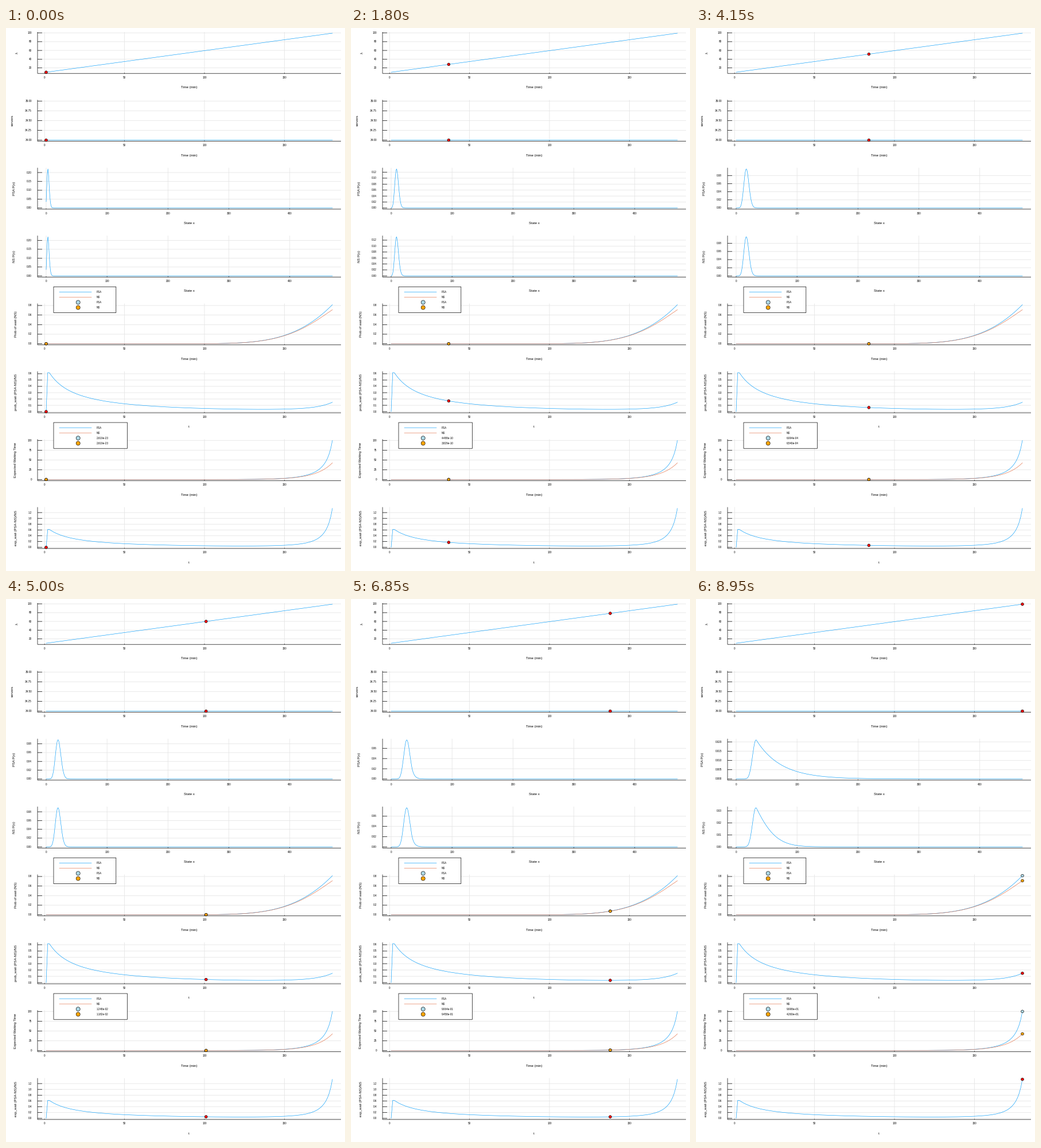
A matplotlib script that plays this animation: 591x947 px, repeating every 9000 ms.

```python
import math

import matplotlib
import matplotlib.pyplot as plt
import numpy as np
from matplotlib.animation import FuncAnimation
from matplotlib.collections import LineCollection
from matplotlib.patches import Circle, Rectangle

W, H, DPI = 591, 947, 100
PX = 72 / DPI
LEFT, RIGHT = 55, 584
ROW = H / 8
BLUE, ORANGE = "#009af9", "#e26f46"
PALE, AMBER, RED = "lightblue", "orange", "red"
THIN = 0.62

SERVERS, MU, N_MAX, STEPS = 34, 3.0, 470, 180
states = np.arange(N_MAX + 1)
times = np.arange(1, STEPS + 1)
service = MU * np.minimum(states, SERVERS)


# Queue model: stationary approximation and the time-dependent solution

def arrival(t):
    return 10 + 0.5 * (t - 1)


def stationary(rate):
    logs = np.concatenate([[0], np.cumsum(np.log(rate / service[1:]))])
    p = np.exp(logs - logs.max())
    return p / p.sum()


def flow(p, rate):
    net = rate * p[:-1] - service[1:] * p[1:]
    d = np.zeros_like(p)
    d[:-1] -= net
    d[1:] += net
    return d


def advance(p, t, n=200):
    h = 1 / n
    for i in range(n):
        s = t + i * h
        mid = arrival(s + h / 2)
        k1 = flow(p, arrival(s))
        k2 = flow(p + h / 2 * k1, mid)
        k3 = flow(p + h / 2 * k2, mid)
        k4 = flow(p + h * k3, arrival(s + h))
        p = p + h / 6 * (k1 + 2 * k2 + 2 * k3 + k4)
    return p


psa = np.array([stationary(arrival(t)) for t in times])
ns = [psa[0]]
for t in times[:-1]:
    ns.append(advance(ns[-1], t))
ns = np.array(ns)

over = np.maximum(states - SERVERS, 0)
prob_psa, prob_ns = (p[:, SERVERS + 1:].sum(axis=1) for p in (psa, ns))
wait_psa, wait_ns = (MU * p @ over for p in (psa, ns))


# Drawing helpers, all in pixels from the top left corner

matplotlib.rcParams["font.family"] = "Liberation Sans"
matplotlib.rcParams["path.snap"] = False
fig = plt.figure(figsize=(W / DPI, H / DPI), dpi=DPI, facecolor="white")
ax = fig.add_axes([0, 0, 1, 1])
ax.set_xlim(0, W)
ax.set_ylim(H, 0)
ax.axis("off")


def text(x, y, s, size=4.6, ha="center", **kw):
    return ax.text(x, y, s, fontsize=size * PX, ha=ha, va="center",
                   color="black", **kw)


def segments(color, width, z):
    lines = LineCollection([], colors=color, linewidths=width * PX, zorder=z)
    ax.add_collection(lines, autolim=False)
    return lines


def stroke(x, y, color, z=3):
    return ax.plot(x, y, color=color, lw=THIN * PX, zorder=z)[0]


def dot(x, y, color, size=4.7, z=4):
    return ax.add_patch(Circle((x, y), size / 2, fc=color, ec="black",
                               lw=THIN * PX, zorder=z))


def widen(lo, hi):
    pad = 0.03 * (hi - lo)
    return lo - pad, hi + pad


def nice_ticks(lo, hi):
    """Pick 4 to 8 ticks, weighing count, roundness and coverage."""
    span = hi - lo
    z = math.floor(math.log10(span))
    best = None
    for e in (z - 1, z):
        for q, nice in ((1, 1), (5, 0.9), (2, 0.7), (2.5, 0.5), (3, 0.2)):
            step = q * 10.0 ** e
            a = math.ceil(lo / step - 1e-9)
            b = math.floor(hi / step + 1e-9)
            n = b - a + 1
            if not 4 <= n <= 8:
                continue
            score = (0.25 * (1 - abs(n - 5) / 5) + 0.25 * nice
                     + 0.5 * span / ((n - 1) * step))
            key = (round(score, 9), -n)
            if best is None or key > best[0]:
                best = key, step, a, b
    _, step, a, b = best
    digits = len(f"{step:.8g}".partition(".")[2])
    return [(k * step, f"{k * step:.{digits}f}") for k in range(a, b + 1)]


class Panel:
    def __init__(self, row, xs, xlabel, ylabel, shift=0):
        self.top = 7 + ROW * row
        self.base = self.top + 72.2
        self.xs, self.shift = xs, shift
        self.xlim = widen(xs[0], xs[-1])
        self.grid = segments("#e4e4e4", 0.8, 1)
        self.marks = segments("black", 0.7, 2)
        self.labels = [text(45, 0, "", ha="right") for _ in range(8)]
        middle = (self.top + self.base) / 2
        self.name = text(18, middle, ylabel, 6, rotation=90)
        text((LEFT + RIGHT) / 2 - 0.5, self.base + 24.6, xlabel, 6)
        self.xticks = [self.px(v) for v, _ in nice_ticks(*self.xlim)]
        for v, s in nice_ticks(*self.xlim):
            text(self.px(v), self.base + 7.1, s)
        self.curves, self.dots = [], []

    def px(self, v):
        lo, hi = self.xlim
        return LEFT + (RIGHT - LEFT) * (v - lo) / (hi - lo)

    def py(self, v):
        lo, hi = self.ylim
        return self.base - (self.base - self.top) * (v - lo) / (hi - lo)

    def scale(self, lo, hi):
        self.ylim = widen(lo, hi)
        ticks = nice_ticks(*self.ylim)
        ys = [self.py(v) for v, _ in ticks]
        self.grid.set_segments(
            [[(LEFT, y), (RIGHT, y)] for y in ys]
            + [[(x, self.top), (x, self.base)] for x in self.xticks])
        self.marks.set_segments(
            [[(LEFT, self.top), (LEFT, self.base)],
             [(LEFT, self.base), (RIGHT, self.base)]]
            + [[(LEFT, y), (LEFT + 8, y)] for y in ys]
            + [[(x, self.base), (x, self.base - 1.2)] for x in self.xticks])
        for i, label in enumerate(self.labels):
            label.set_visible(i < len(ticks))
            if i < len(ticks):
                label.set_text(ticks[i][1])
                label.set_y(ys[i])
        # the axis name moves out as tick labels get wider
        units = max(2 * len(s) - s.count(".") for _, s in ticks)
        self.name.set_x(18 - 1.75 * (units - 5) + self.shift)

    def curve(self, data, color=BLUE):
        self.curves.append(stroke(self.px(self.xs), self.py(data), color))

    def track(self, data, color):
        self.dots.append((dot(0, 0, color), data))

    def move(self, i):
        for d, data in self.dots:
            d.center = self.px(times[i]), self.py(data[i])


def time_panel(row, xlabel, ylabel, series, lims=None, shift=0):
    panel = Panel(row, times, xlabel, ylabel, shift)
    every = np.concatenate([data for data, _, _ in series])
    panel.scale(*(lims or (every.min(), every.max())))
    for data, color, _ in series:
        panel.curve(data, color)
    for data, _, fill in series:
        panel.track(data, fill)
    return panel


def state_panel(row, ylabel):
    panel = Panel(row, states, "State x", ylabel)
    panel.scale(0, 1)
    panel.curve(states * 0.0)
    return panel


def legend(row, width):
    y = ROW * row - 22.2
    ax.add_patch(Rectangle((83, y), width, 45.2, fc="white", ec="black",
                           lw=0.7 * PX, zorder=6))
    rows = [y + 9.05 * (k + 1) for k in range(4)]
    for level, color in zip(rows, (BLUE, ORANGE)):
        stroke([93, 149], [level, level], color, 7)
    for level, color in zip(rows[2:], (PALE, AMBER)):
        dot(125.7, level, color, 7, 7)
    return [text(158, level, s, ha="left", zorder=7)
            for level, s in zip(rows, ("PSA", "NS") * 2)]


def gap(a, b):
    return (a - b) / b


def pair(a, b):
    return [(a, BLUE, PALE), (b, ORANGE, AMBER)]


def single(data):
    return [(data, BLUE, RED)]


panels = [
    time_panel(0, "Time (min)", "λ", single(arrival(times)), shift=3.5),
    time_panel(1, "Time (min)", "servers",
               single(np.full(STEPS, float(SERVERS))), (34, 35)),
    time_panel(4, "Time (min)", "Prob of wait (NS)", pair(prob_psa, prob_ns)),
    time_panel(5, "t", "prob_wait (PSA-NS)/NS", single(gap(prob_psa, prob_ns))),
    time_panel(6, "Time (min)", "Expected Waiting Time",
               pair(wait_psa, wait_ns)),
    time_panel(7, "t", "exp_wait (PSA-NS)/NS", single(gap(wait_psa, wait_ns))),
]
spreads = [(state_panel(2, "PSA P(x)"), psa), (state_panel(3, "NS P(x)"), ns)]
legend(4, 108.8)
values = legend(6, 128.5)[2:]


def update(i):
    for panel, dist in spreads:
        panel.scale(0, dist[i].max())
        panel.curves[0].set_ydata(panel.py(dist[i]))
    for panel in panels:
        panel.move(i)
    for label, data in zip(values, (wait_psa, wait_ns)):
        label.set_text(f"{data[i]:.3e}")
    return []


anim = FuncAnimation(fig, update, frames=STEPS, interval=50, repeat=True,
                     repeat_delay=0, init_func=lambda: update(0), blit=False)
plt.show()
```
